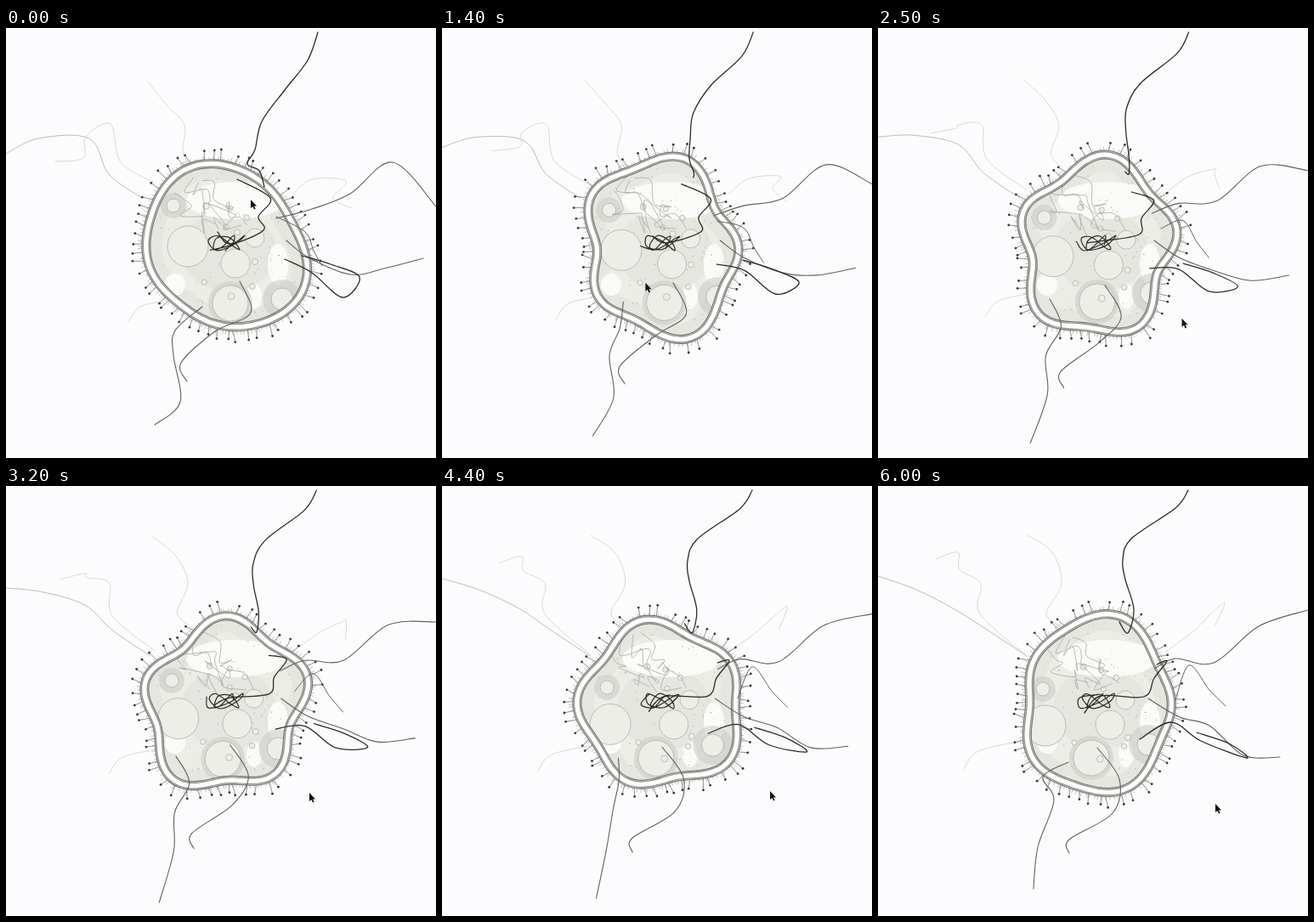
These frames come from a looping animation (506 px wide and 506 px high, 6100 ms). An HTML page:

```html
<!DOCTYPE html>
<html lang="en">
<head>
<meta charset="utf-8">
<title>Drifting cell</title>
<style>
html, body { margin: 0; width: 100%; height: 100%; overflow: hidden; background: #fcfcff; }
svg { display: block; width: 506px; height: 506px; }
path { stroke-linecap: round; stroke-linejoin: round; }
</style>
</head>
<body>
<svg id="stage" viewBox="0 0 506 506">
  <defs><clipPath id="inside"><path id="clip"/></clipPath></defs>
  <g id="back"></g>
  <g id="pins"></g>
  <path id="base" fill="#edede7"/>
  <g id="body" clip-path="url(#inside)"></g>
  <g id="wall"></g>
  <g id="front"></g>
  <path id="arrow" d="M0 0V10L2.4 8L4 11.6L5.6 10.8L4 7.4H7Z" fill="#111"/>
</svg>
<script>
const LOOP = 6100, STEP = 100, SPAN = 6000, TAU = 2 * Math.PI;
const CX = 258, CY = 258;
const $ = id => document.getElementById(id);
const back = $('back'), body = $('body'), front = $('front');

function add(parent, tag, attrs) {
  const el = document.createElementNS('http://www.w3.org/2000/svg', tag);
  for (const k in attrs) el.setAttribute(k, attrs[k]);
  return parent.appendChild(el);
}

let seed = 41;
const rnd = () => (seed = (seed * 16807) % 2147483647) / 2147483647;
const spread = (a, b) => a + (b - a) * rnd();
const many = (n, make) => Array.from({ length: n }, (_, i) => make(i));
const poses = text => text.split('/').map(s => s.trim().split(/\s+/).map(Number));

const linear = u => u;
const smooth = u => { const v = Math.min(1, u * 1.15); return v * v * (3 - 2 * v); };
const easeOut = u => 1 - (1 - u) ** 2;

// Smooth path through poses at the given moments
function blend(keys, times, t) {
  const last = keys.length - 1;
  let i = 0;
  while (i < last - 1 && t >= times[i + 1]) i++;
  const a = Math.max(0, i - 1), d = Math.min(last, i + 2);
  const h = times[i + 1] - times[i], u = Math.min(1, (t - times[i]) / h);
  return keys[i].map((p, n) => {
    const q = keys[i + 1][n];
    const m = (q - keys[a][n]) * h / (times[i + 1] - times[a]);
    const w = (keys[d][n] - p) * h / (times[d] - times[i]);
    return p + u * (m + u * (3 * (q - p) - 2 * m - w + u * (2 * (p - q) + m + w)));
  });
}

// Curve through a flat list of coordinates
function curve(c, closed) {
  const n = c.length / 2;
  const pt = i => {
    const k = closed ? (i + n) % n : Math.max(0, Math.min(n - 1, i));
    return [c[2 * k], c[2 * k + 1]];
  };
  let d = 'M' + pt(0).map(v => v.toFixed(1));
  for (let i = 0; i < (closed ? n : n - 1); i++) {
    const [a, b, e, f] = [pt(i - 1), pt(i), pt(i + 1), pt(i + 2)];
    const out = [0, 1].map(k => b[k] + (e[k] - a[k]) / 6);
    const into = [0, 1].map(k => e[k] - (f[k] - b[k]) / 6);
    d += 'C' + [...out, ...into, ...e].map(v => v.toFixed(1));
  }
  return closed ? d + 'Z' : d;
}

// Membrane: a circle bent by a two-lobed, a three-lobed and a five-lobed wave.
// Each pose holds the cosine and sine parts of the two- and five-lobed waves.
const TIMES = [0, 800, 1900, 3200, 4400, 5000, 6000];
const WAVES = poses(`-1.1 8.3 -.7 1.2 / -6.6 9.1 4.7 3.1 / -11.6 1.1 8.2 -4 / -3.3 -3.5 -.6 -8.8 /
  -.3 1.3 -5.8 -2.4 / -3.9 3.2 -1.9 2.1 / -10.2 -1.3 3.9 -.8`);
const POINTER = poses('288 202/138 270/335 319/357 361/386 359/363 335/397 374');

function membrane(t) {
  const [c2, s2, c5, s5] = blend(WAVES, TIMES, t);
  const s3 = .9 + 2.1 * Math.cos(TAU * t / 5000);
  return a => 98.6 + c2 * Math.cos(2 * a) + s2 * Math.sin(2 * a) + s3 * Math.sin(3 * a)
    + c5 * Math.cos(5 * a) + s5 * Math.sin(5 * a);
}
const polar = (r, a) => [CX + r * Math.cos(a), CY + r * Math.sin(a)];

// Cytoplasm
const shade = add(body, 'path', { fill: 'none', stroke: '#dcdcd8', 'stroke-width': 16, opacity: .45 });
const blob = (fill, cx, cy, rx, ry) => add(body, 'ellipse', { fill, cx, cy, rx, ry });
blob('#e6e6e0', 262, 262, 56, 48);
blob('#fafaf9', 270, 203, 58, 22);
blob('#fafaf9', 199, 302, 12, 13);
blob('#fafaf9', 320, 278, 12, 24);
blob('#fafaf9', 292, 316, 9, 15);

const specks = many(110, () => ({
  a: rnd() * TAU, k: Math.sqrt(rnd()) * .86,
  el: add(body, 'circle', { r: .6, fill: rnd() < .4 ? '#d8d894' : '#a3a3a3' })
}));

// Vesicles drift from one place to another, some inside a grey halo
const bubbles = [];
function bubble(r, halo, from, to) {
  const rings = halo ? [add(body, 'circle', { r: halo, fill: '#cdcdc9', opacity: .6 })] : [];
  rings.push(add(body, 'circle', { r, fill: '#eeeee8', stroke: '#b0b0ac', 'stroke-width': .8 }));
  bubbles.push({ rings, from, to });
}
bubble(24, 0, [214, 257], [197, 282]);
bubble(17, 0, [270, 277], [273, 281]);
bubble(21, 26, [264, 324], [251, 320]);
bubble(13, 23, [325, 319], [318, 304]);
bubble(8, 15, [197, 209], [194, 239]);
bubble(11, 0, [293, 247], [291, 252]);
bubble(3.5, 0, [293, 275], [294, 296]);
for (let i = 0; i < 8; i++) {
  const x = spread(222, 290), y = i < 5 ? spread(205, 245) : spread(282, 318);
  bubble(spread(3, 4.2), 0, [x, y], [x + spread(-5, 8), y + spread(-4, 12)]);
}

// Fine loose threads in the upper half
const threads = many(4, n => ({
  el: add(body, 'path', { fill: 'none', stroke: '#a9a9a4', 'stroke-width': .8 }),
  pts: many(9, i => [200 + 12 * n + 6 * i + spread(-14, 14), 185 + 7 * i + spread(-14, 14)])
}));

// Long strands: poses are spread evenly over the loop
const strands = [];
function strand(parent, stroke, width, ease, text) {
  const keys = poses(text);
  strands.push({
    el: add(parent, 'path', { fill: 'none', stroke, 'stroke-width': width }),
    keys, ease, times: keys.map((_, i) => i / (keys.length - 1))
  });
}
const PALE = '#dadad0', GREY = '#bdbdb6', DARK = '#62625a', BLACK = '#2c2c26';

strand(back, GREY, 1, smooth, `0 148 38 130 98 130 121 172 160 200 /
  0 106 45 122 90 145 128 169 175 200`);
strand(back, PALE, 1, smooth, `58 157 91 153 94 128 123 113 135 158 175 182 /
  68 86 94 78 96 98 121 115 120 150 175 200`);
strand(back, PALE, 1, smooth, `167 63 190 92 210 114 208 145 216 162 /
  176 58 205 78 216 115 198 150 215 165`);
strand(back, PALE, 1, smooth, `338 195 360 178 400 180 385 200 407 212 /
  338 195 370 172 392 150 408 138 396 165`);
strand(back, PALE, 1, linear, '144 345 158 328 182 322 / 101 333 118 312 170 300');
strand(front, DARK, 1.1, easeOut, `506 210 455 158 405 195 360 213 318 224 /
  506 146 448 165 395 208 350 203 325 215`);
strand(front, DARK, 1.1, linear, `491 271 445 283 405 290 356 270 330 250 /
  473 319 430 317 390 282 355 272 318 250`);
strand(front, BLACK, 1.3, linear, `328 272 360 288 396 317 416 293 382 278 348 268 /
  308 298 345 278 380 300 434 320 413 303 375 290`);
strand(front, DARK, 1, smooth, `318 222 352 240 362 262 372 280 /
  350 252 366 211 390 240 409 259`);
strand(front, DARK, 1.1, linear, `175 467 205 440 197 385 199 356 231 328 /
  180 490 198 430 198 385 216 350 200 318 / 183 474 188 425 207 370 194 342 224 325`);
strand(front, DARK, 1.1, smooth, `213 416 206 394 246 357 288 335 275 298 /
  225 432 225 416 276 385 284 345 258 308`);
strand(front, BLACK, 1.3, easeOut, `367 5 355 38 328 73 301 110 293 143 284 160 298 168 304 187 /
  365 5 350 26 298 62 288 87 291 110 301 145 294 173 284 160`);
strand(front, BLACK, 1.3, smooth, `272 178 311 200 297 222 303 238 264 254 249 240 /
  328 210 340 206 325 226 313 248 262 247 243 267`);
const knot = add(front, 'path', { fill: 'none', stroke: BLACK, 'stroke-width': 1.2 });

// Double wall: stacked strokes from wide to narrow
const wall = [['#696964', 11], ['#b9b9b2', 9.2], ['#7c7c77', 7], ['#fdfdfd', 5.6]]
  .map(([stroke, w]) => add($('wall'), 'path', { fill: 'none', stroke, 'stroke-width': w }));

const fuzz = add($('pins'), 'path', { fill: 'none', stroke: '#a6a6a0', 'stroke-width': .7 });
const stems = add($('pins'), 'path', { fill: 'none', stroke: '#74746c', 'stroke-width': .8 });
const spikes = (n, min, max) =>
  many(n, i => ({ a: (i + rnd() * .7) / n * TAU, len: spread(min, max), lean: spread(-.25, .25) }));
const hairs = spikes(150, 2, 5);
const pins = spikes(54, 9, 14);
pins.forEach(p => p.el = add($('pins'), 'circle', { r: 1.4, fill: '#3a3a34' }));

function spike(r, s) {
  const [x, y] = polar(r(s.a), s.a);
  const [x0, y0] = polar(r(s.a - .03), s.a - .03), [x1, y1] = polar(r(s.a + .03), s.a + .03);
  const dir = Math.atan2(x0 - x1, y1 - y0) + s.lean;
  return [x, y, x + s.len * Math.cos(dir), y + s.len * Math.sin(dir)];
}
const lines = list => list.map(p => curve(p)).join('');
const put = (el, x, y) => { el.setAttribute('cx', x.toFixed(1)); el.setAttribute('cy', y.toFixed(1)); };

function draw(t) {
  const u = t / SPAN, r = membrane(t);
  const ring = off => curve(many(48, i => polar(r(i / 48 * TAU) + off, i / 48 * TAU)).flat(), true);
  const mid = ring(-5);
  for (const el of [...wall, $('base'), $('clip')]) el.setAttribute('d', mid);
  shade.setAttribute('d', ring(-16));

  const tips = pins.map(p => spike(r, p));
  tips.forEach((p, i) => put(pins[i].el, p[2], p[3]));
  stems.setAttribute('d', lines(tips));
  fuzz.setAttribute('d', lines(hairs.map(h => spike(r, h))));

  for (const s of specks) put(s.el, ...polar(r(s.a) * s.k, s.a));
  for (const { rings, from, to } of bubbles) {
    const place = from.map((v, k) => v + (to[k] - v) * smooth(u));
    rings.forEach(el => put(el, ...place));
  }
  for (const s of strands) s.el.setAttribute('d', curve(blend(s.keys, s.times, s.ease(u))));
  threads.forEach(({ el, pts }, n) => el.setAttribute('d', curve(
    pts.flatMap(([x, y], i) => [x + 4 * Math.sin(t / 900 + i + n), y + 4 * Math.cos(t / 1100 + i * 2)]))));
  knot.setAttribute('d', curve(many(16, i => [
    258 + (10 + i) * Math.sin(i * 1.1 + t / 2500), 253 + 9 * Math.cos(i * 1.7 + t / 1800)]).flat()));
  $('arrow').setAttribute('transform', `translate(${blend(POINTER, TIMES, t)})`);
}

let start = null;
function tick(now) {
  if (start === null) start = now;
  draw(Math.floor((now - start) % LOOP / STEP) * STEP);
  requestAnimationFrame(tick);
}
draw(0);
requestAnimationFrame(tick);
</script>
</body>
</html>
```
